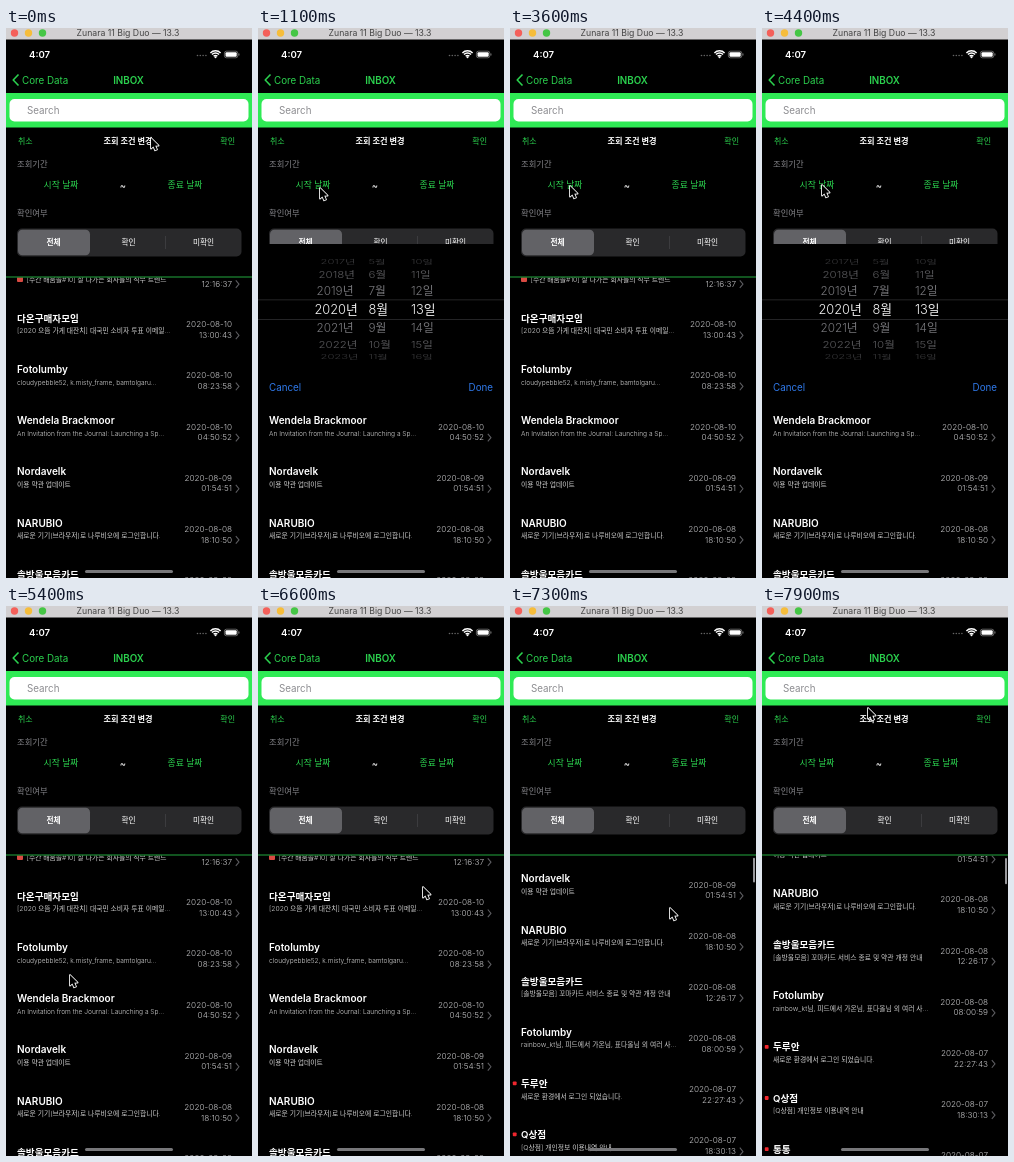
Recreate the animation shown at these times as an HTML page with a canvas. Size 246 by 550 pixels, loop 8 s.

```html
<!DOCTYPE html>
<html lang="ko">
<head>
<meta charset="utf-8">
<title>Inbox filter</title>
<style>
  html, body { margin: 0; width: 100%; height: 100%; overflow: hidden; background: #000; }
  canvas { display: block; width: 246px; height: 550px; }
</style>
</head>
<body>
<canvas id="stage"></canvas>
<script>
const W = 246, H = 550, LOOP = 8000, STEP = 100;
const GREEN = '#2bd14e', BLUE = '#2f78e8', GRAY = '#85858a';
const FONT = '"Inter", "Noto Sans CJK KR", "Noto Sans CJK", sans-serif';
const LIST_TOP = 249, ROW = 51.15;

const canvas = document.getElementById('stage');
const ctx = canvas.getContext('2d');
const ratio = window.devicePixelRatio || 1;
canvas.width = W * ratio;
canvas.height = H * ratio;

const mails = [
  ['주간 소식', '     [주간 배움솔#10] 잘 나가는 회사들의 직무 트렌드', '2020-08-10', '12:16:37'],
  ['다온구매자모임', '[2020 으뜸 가게 대잔치] 대국민 소비자 투표 이메일...', '2020-08-10', '13:00:43'],
  ['Fotolumby', 'cloudypebble52, k.misty_frame, bamtolgaru...', '2020-08-10', '08:23:58'],
  ['Wendela Brackmoor', 'An Invitation from the Journal: Launching a Sp...', '2020-08-10', '04:50:52'],
  ['Nordavelk', '이용 약관 업데이트', '2020-08-09', '01:54:51'],
  ['NARUBIO', '새로운 기기(브라우저)로 나루비오에 로그인합니다.', '2020-08-08', '18:10:50'],
  ['솔방울모음카드', '[솔방울모음] 꼬마카드 서비스 종료 및 약관 개정 안내', '2020-08-08', '12:26:17'],
  ['Fotolumby', 'rainbow_kt님, 피드에서 가온님, 표다올님 외 여러 사…', '2020-08-08', '08:00:59'],
  ['두루안', '새로운 환경에서 로그인 되었습니다.', '2020-08-07', '22:27:43', true],
  ['Q상점', '[Q상점] 개인정보 이용내역 안내', '2020-08-07', '18:30:13', true],
  ['통통', '서비스 이용 안내', '2020-08-07', '15:12:08', true]
];

// Pointer path: time, x, y
const path = [
  [0, 145, 110], [300, 167, 132], [700, 39, 157], [900, 60, 159], [1000, 62, 160],
  [1300, 62, 160], [1600, 37, 350], [1800, 38, 351], [2000, 110, 390], [2100, 153, 300],
  [2300, 129, 143], [2600, 129, 143], [3000, 60, 158], [4000, 60, 158], [4300, 45, 153],
  [4400, 60, 157], [4900, 60, 157], [5050, 60, 155], [5300, 38, 348], [5500, 90, 390],
  [5800, 177, 157], [5900, 178, 158], [6250, 214, 350], [6600, 165, 281], [6800, 165, 281],
  [7300, 160, 302], [7500, 159, 305], [7900, 106, 102], [8000, 106, 102]
];
const pickerOpen = [[1000, 1700], [3000, 3600], [4000, 4700], [5000, 5400], [5900, 6300]];
const SCROLL_START = 6850;

function text(str, x, y, size, color, weight = 400, align = 'left') {
  ctx.font = `${weight} ${size}px ${FONT}`;
  ctx.textAlign = align;
  ctx.fillStyle = color;
  ctx.fillText(str, x, y + size * 0.36);
}

function rect(x, y, w, h, color, radius = 0) {
  ctx.fillStyle = color;
  ctx.beginPath();
  ctx.roundRect(x, y, w, h, radius);
  ctx.fill();
}

function dot(x, y, r, color) {
  ctx.fillStyle = color;
  ctx.beginPath();
  ctx.arc(x, y, r, 0, Math.PI * 2);
  ctx.fill();
}

function stroke(points, color, width) {
  ctx.strokeStyle = color;
  ctx.lineWidth = width;
  ctx.beginPath();
  points.forEach(([x, y]) => ctx.lineTo(x, y));
  ctx.stroke();
}

function clipped(y, height, draw) {
  ctx.save();
  ctx.beginPath();
  ctx.rect(0, y, W, height);
  ctx.clip();
  draw();
  ctx.restore();
}

function pointerAt(t) {
  const i = Math.max(1, path.findIndex(p => p[0] >= t));
  const [t0, x0, y0] = path[i - 1], [t1, x1, y1] = path[i];
  const u = (t - t0) / (t1 - t0);
  const e = u * u * (3 - 2 * u);
  return [x0 + (x1 - x0) * e, y0 + (y1 - y0) * e];
}

function scrollAt(t) {
  return t < SCROLL_START ? 0 : 212 * (1 - Math.exp(-(t - SCROLL_START) / 274));
}

function drawTitleBar() {
  rect(0, 0, W, 11.5, '#d2d0d2');
  ['#f4605a', '#f6bd3b', '#45c645'].forEach((c, i) => dot(8.5 + i * 14, 5, 3.7, c));
  text('Zunara 11 Big Duo — 13.3', 122, 5, 8.7, '#454545', 400, 'center');
}

function drawStatus() {
  text('4:07', 23, 26.5, 9.6, '#fff', 600);
  for (let i = 0; i < 4; i++) dot(191.5 + i * 2.8, 27.5, 0.8, '#666');
  ctx.strokeStyle = '#fff';
  ctx.lineWidth = 1.5;
  [2.6, 5, 7.2].forEach(r => {
    ctx.beginPath();
    ctx.arc(209.5, 30, r, -Math.PI * 0.75, -Math.PI * 0.25);
    ctx.stroke();
  });
  dot(209.5, 29.3, 1, '#fff');
  ctx.strokeStyle = '#888';
  ctx.lineWidth = 0.7;
  ctx.beginPath();
  ctx.roundRect(218.4, 23.2, 13.4, 6.6, 2);
  ctx.stroke();
  rect(219.5, 24.3, 11.2, 4.4, '#fff', 1);
  rect(232.5, 25.4, 0.9, 2.2, '#888');
}

function drawNavigation() {
  stroke([[12.5, 46.5], [7.2, 52], [12.5, 57.5]], GREEN, 1.6);
  text('Core Data', 16, 52, 9.8, GREEN);
  text('INBOX', 122.5, 52, 9.8, GREEN, 600, 'center');
  rect(0, 65, W, 34.5, '#2fea55');
  rect(3.5, 71, 239, 22.5, '#fff', 5);
  text('Search', 21, 82.3, 9.8, '#8d8d91');
}

function drawFilter() {
  text('취소', 12, 113, 8, GREEN);
  text('조회 조건 변경', 122, 113, 8.2, '#fff', 700, 'center');
  text('확인', 229, 113, 8, GREEN, 400, 'right');
  text('조회기간', 11, 136.5, 8.3, GRAY, 300);
  text('시작 날짜', 55, 157, 8.8, GREEN, 400, 'center');
  text('~', 117, 157.5, 9.5, '#fff', 400, 'center');
  text('종료 날짜', 179, 157, 8.8, GREEN, 400, 'center');
  text('확인여부', 11, 185.5, 8.3, GRAY, 300);
  rect(11, 200.5, 224.5, 28, '#29292b', 5);
  rect(12, 201.7, 72, 25.6, '#626266', 4.5);
  rect(159, 208, 0.7, 13, '#454548');
  ['전체', '확인', '미확인'].forEach((s, i) =>
    text(s, 47.5 + i * 75, 214.5, 7.7, '#fff', i ? 400 : 600, 'center'));
  rect(0, 248.5, W, 1, '#22a83f');
}

function drawMail([name, subject, date, time, unread], y) {
  const hangul = /[가-힣]/;
  text(name, 11, y, hangul.test(name) ? 9.6 : 10, '#fff', 600);
  text(subject, 11, y + 12.7, hangul.test(subject) ? 6.8 : 6.6, '#d2d2d2', 300);
  text(date, 226, y + 6, 8.2, '#c4c4c6', 300, 'right');
  text(time, 226, y + 16.7, 8.2, '#c4c4c6', 300, 'right');
  stroke([[229.8, y + 13.2], [233, y + 17], [229.8, y + 20.8]], '#5c5c60', 1.1);
  if (unread) rect(2.8, y - 2, 3.8, 3.8, '#f0262e', 0.8);
}

function drawList(t) {
  const offset = scrollAt(t);
  clipped(LIST_TOP + 0.5, H, () => {
    mails.forEach((mail, i) => drawMail(mail, 290.3 + (i - 1) * ROW - offset));
    rect(11, 248.5 - offset, 6, 5.5, '#d94a42', 1);
    if (offset) rect(243, 250 + offset * 0.01, 2, 18 + offset * 0.04, '#98989c', 1);
  });
}

function drawPicker() {
  const middle = 281.5, radius = 56.8, angle = 19 * Math.PI / 180;
  const shades = ['#f4f4f4', '#77777b', '#58585b', '#353537'];
  rect(0, 216, W, 158, '#000');
  clipped(216, 158, () => {
    for (let k = -3; k <= 3; k++) {
      const d = Math.abs(k), size = d ? 12 - d * 0.25 : 12.8;
      ctx.save();
      ctx.translate(0, middle + radius * Math.sin(k * angle));
      ctx.scale(1, Math.cos(k * angle));
      text(`${2020 + k}년`, 56.5 + d * 2, 0, size, shades[d], 300);
      text(`${8 + k}월`, 110.5, 0, size, shades[d], 300);
      text(`${13 + k}일`, 153, 0, size, shades[d], 300);
      ctx.restore();
    }
    rect(0, 271.5, W, 0.7, '#303033');
    rect(0, 291.3, W, 0.7, '#303033');
  });
  text('Cancel', 11, 359.3, 9.8, BLUE);
  text('Done', 235, 359.3, 9.8, BLUE, 400, 'right');
}

function drawPointer([x, y]) {
  const shape = [[0, 0], [0, 10.6], [2.4, 8.4], [4.1, 12.3], [6, 11.5], [4.3, 7.7], [7.6, 7.6]];
  ctx.beginPath();
  shape.forEach(([dx, dy]) => ctx.lineTo(x + dx, y + dy));
  ctx.closePath();
  ctx.lineJoin = 'round';
  ctx.strokeStyle = '#fff';
  ctx.lineWidth = 1.7;
  ctx.stroke();
  ctx.fillStyle = '#000';
  ctx.fill();
}

function draw(now) {
  const t = Math.floor((now % LOOP) / STEP) * STEP;
  ctx.setTransform(ratio, 0, 0, ratio, 0, 0);
  rect(0, 0, W, H, '#000');
  drawTitleBar();
  drawStatus();
  drawNavigation();
  drawList(t);
  drawFilter();
  if (pickerOpen.some(([from, to]) => t >= from && t < to)) drawPicker();
  rect(79, 542, 88, 3, '#77777a', 1.5);
  drawPointer(pointerAt(t));
}

let start;
function tick(now) {
  start ??= now;
  draw(Math.max(0, now - start));
  requestAnimationFrame(tick);
}
draw(0);
requestAnimationFrame(tick);
</script>
</body>
</html>
```
